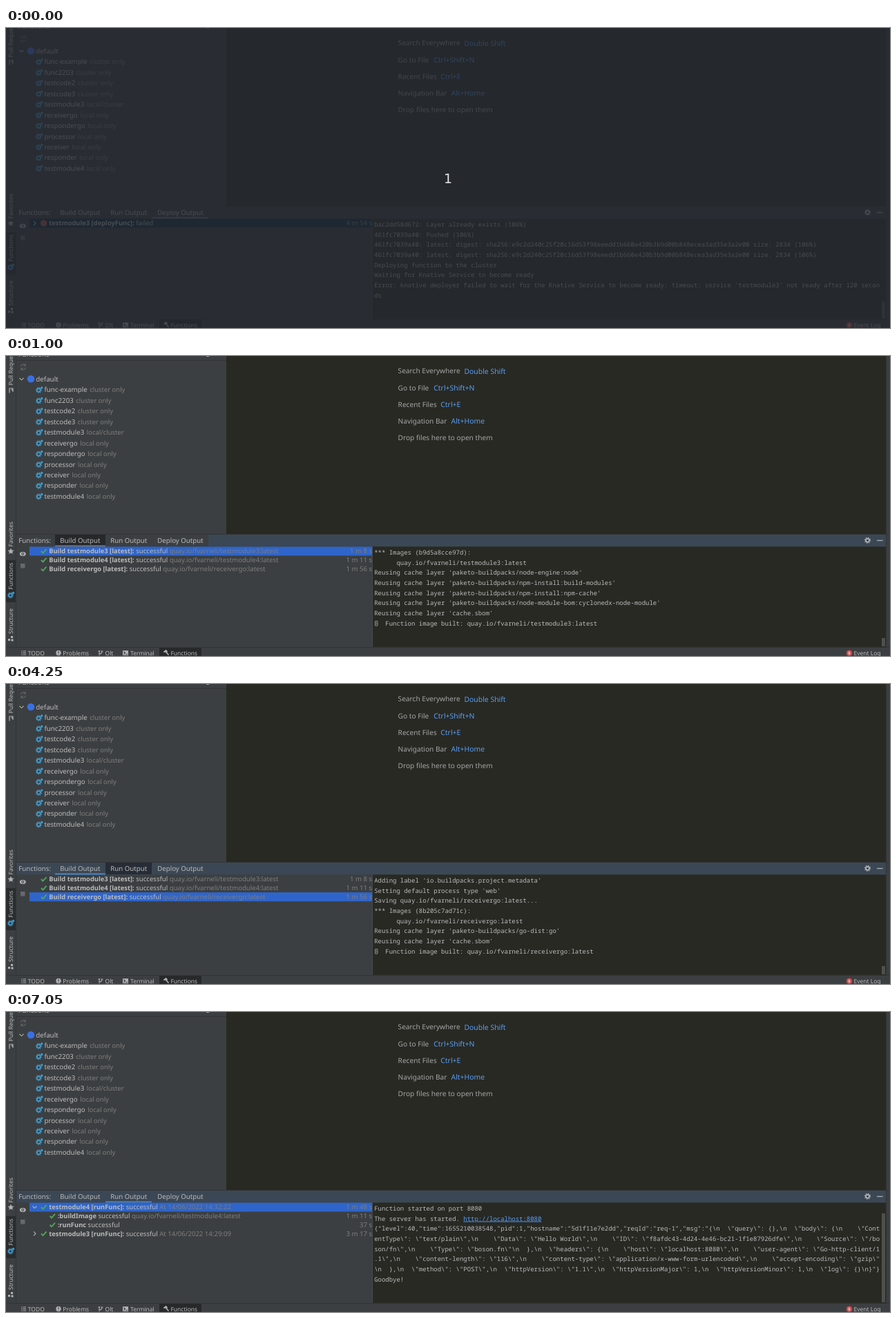
An HTML page that plays this animation: 1280 px wide and 435 px high, repeating every 8 s.

```html
<!DOCTYPE html>
<html lang="en">
<head>
<meta charset="utf-8">
<title>Functions output</title>
<style>
  html, body { margin: 0; width: 100%; height: 100%; overflow: hidden; background: #3c3f41; }
  svg { display: block; }
  text { font: 9.75px 'Noto Sans', sans-serif; fill: #bbb; white-space: pre; text-rendering: geometricPrecision; }
  .hint { font-size: 10.13px; fill: #a6a6a6; }
  .key { font-size: 10.4px; fill: #589df6; }
  .place { font-size: 9.45px; fill: #7d7d7d; }
  .tab { font-size: 9.7px; }
  .row { font-size: 9.6px; }
  .row .name { font-size: 9.35px; font-weight: bold; }
  .bar { font-size: 8.5px; }
  .log { font: 8.98px 'Noto Sans Mono', monospace; }
  .dim { fill: #7d7d7d; }
  .end { text-anchor: end; }
  .link { fill: #589df6; text-decoration: underline; }
  .count { font: 19px 'DejaVu Sans', sans-serif; fill: #e4e5e6; text-anchor: middle; }
  .badge { font-size: 6px; fill: #fff; text-anchor: middle; }
</style>
</head>
<body>
<svg width="1280" height="435" viewBox="0 0 1280 435" xml:space="preserve"><g id="frame"></g><g id="panel"></g></svg>
<script>
const DURATION = 8000;
const COLUMNS = 136;
const GREY = '#afb1b3';
const repo = name => `quay.io/fvarneli/${name}:latest`;

// Drawing helpers; text is placed by the middle of its capitals.
const rect = (x, y, w, h, fill) => `<rect x="${x}" y="${y}" width="${w}" height="${h}" fill="${fill}"/>`;
const disc = (x, y, r, fill) => `<circle cx="${x}" cy="${y}" r="${r}" fill="${fill}"/>`;
const line = (d, color = GREY, width = 1.1) => `<path d="${d}" fill="none" stroke="${color}" stroke-width="${width}"/>`;
const text = (x, y, content, cls = '', extra = '') =>
  `<text x="${x}" y="${y}" dy=".357em" class="${cls}" ${extra}>${content}</text>`;
const span = (content, cls, dx = 0) => `<tspan class="${cls}" dx="${dx}">${content}</tspan>`;
const sideways = (bottom, label) => text(0, 0, label, 'bar', `transform="translate(7 ${bottom}) rotate(-90)"`);
const cog = (x, y, r, color) =>
  `<g fill="none" stroke="${color}"><circle cx="${x}" cy="${y}" r="${r * .65}" stroke-width="${r * .45}"/>` +
  `<circle cx="${x}" cy="${y}" r="${r}" stroke-width="${r * .4}" stroke-dasharray="${r * .3927}"/></g>`;
const chevron = (x, y, open) =>
  line(open ? `M${x - 3} ${y - 1.5}l3 3 3-3` : `M${x - 1.5} ${y - 3}l3 3-3 3`);
const check = (x, y) => line(`M${x - 3.6} ${y}l2.6 2.7 5-5.6`, '#4fa45a', 1.9);

const functions = [
  ['func-example', 'cluster only'], ['func2203', 'cluster only'], ['testcode2', 'cluster only'],
  ['testcode3', 'cluster only'], ['testmodule3', 'local/cluster'], ['receivergo', 'local only'],
  ['respondergo', 'local only'], ['processor', 'local only'], ['receiver', 'local only'],
  ['responder', 'local only'], ['testmodule4', 'local only']
];
const hints = [
  ['Search Everywhere', 'Double Shift', 663.5], ['Go to File', 'Ctrl+Shift+N', 619.3],
  ['Recent Files', 'Ctrl+E', 629.3], ['Navigation Bar', 'Alt+Home', 644.5],
  ['Drop files here to open them', '', 0]
];
const tabs = [['Build Output', 71, 73, 78.2], ['Run Output', 144, 67, 151.2], ['Deploy Output', 211, 82, 219.2]];
const TABS_END = 293;

function drawFrame() {
  const tree = functions.map(([name, place], i) => {
    const y = 49 + i * 15.44;
    return cog(47.4, y + .5, 3.7, '#3e9bd0') + disc(51.8, y - 3, 1.7, '#3e9bd0') +
      text(55.4, y, `${name} ${span(place, 'place', 1)}`);
  }).join('');
  const welcome = hints.map(([label, key, x], i) => {
    const y = 21.8 + i * 24.15;
    return text(567.6, y, label, 'hint') + text(x, y, key, 'hint key');
  }).join('');

  return rect(0, 0, 1280, 435, '#3c3f41') + rect(14, 0, 1, 422, '#323435') +
    rect(319, 0, 955, 258, '#282923') + rect(1274, 0, 1, 422, '#323435') +
    rect(0, 296, 14, 61, '#2a2c2d') + rect(222, 423, 61, 12, '#27292a') +
    // left strip
    sideways(42.5, 'Pull Requests') + line('M5 46.500v7M5 47h5v5M8 50l2-3', GREY, 1.2) +
    sideways(276.5, 'Favorites') +
    `<path d="M7 278.500l1.300 3 3.200.3-2.400 2.100.7 3.200-2.800-1.700-2.800 1.700.7-3.200-2.400-2.100 3.200-.3z" fill="${GREY}"/>` +
    sideways(338.5, 'Functions') + cog(6.4, 347, 3.7, '#3e9bd0') + disc(10.5, 343.5, 1.7, '#3e9bd0') +
    sideways(403, 'Structure') + rect(7, 406, 3, 3, GREY) + rect(3, 410, 3, 3, GREY) + rect(7.5, 410.5, 3, 3, GREY) +
    // function tree
    text(18.3, -2, 'Functions') + disc(292, -2, 3, GREY) + rect(15, 6, 304, 1, '#323435') +
    line('M21.500 15.500a3.500 3.500 0 0 1 6.300-2M28.500 16.500a3.500 3.500 0 0 1-6.300 2M28 11v3h-3M22 21v-3h3', '#66696b') +
    chevron(22.5, 33.3, true) + disc(36, 33.3, 5.3, '#3970e4') + text(43.3, 33.5, 'default') + tree + welcome +
    // bottom bar
    rect(0, 422, 1280, 1, '#323435') +
    line('M22 428h1.500M24.500 428h4.500M22 430.500h1.500M24.500 430.500h4.500M22 433h1.500M24.500 433h4.500') +
    text(31.8, 430.7, 'TODO', 'bar') +
    disc(76, 430.5, 3.7, GREY) + line('M76 428v3M76 432v1', '#3c3f41') + text(82.3, 430.7, 'Problems', 'bar') +
    line('M135 427v7M135 432q4 0 4-4M133.500 428h3M137.500 428h3') + text(143.5, 430.7, 'Olt', 'bar') +
    rect(169, 427, 8, 7, GREY) + line('M170.500 428.500l2 2-2 2M173.500 432.500h2.500', '#3c3f41') +
    text(180, 430.7, 'Terminal', 'bar') +
    line('M228.500 429.500l3-2.500 2 2M231 428.500l4.500 5', GREY, 1.8) + text(238.4, 430.7, 'Functions', 'bar') +
    disc(1221, 430.7, 4.3, '#c94f4f') + text(1221, 430.7, '8', 'badge') + text(1227.5, 430.7, 'Event Log', 'bar');
}

// Rows: [name, status, detail, duration, arrow, child]
const build = (name, time) => [`Build ${name} [latest]:`, 'successful', repo(name), time];
const run4 = ['testmodule4 [runFunc]:', 'successful', 'At 14/06/2022 14:32:22', '1 m 48 s'];
const run3 = ['testmodule3 [runFunc]:', 'successful', 'At 14/06/2022 14:29:09', '3 m 17 s', 'closed'];
const lists = {
  deploy: [['testmodule3 [deployFunc]:', 'failed', '', '4 m 54 s', 'closed']],
  build: [build('testmodule3', '1 m 8 s'), build('testmodule4', '1 m 11 s'), build('receivergo', '1 m 56 s')],
  run: [[...run4, 'closed'], run3],
  runOpen: [
    [...run4, 'open'],
    [':buildImage', 'successful', repo('testmodule4'), '1 m 11 s', '', true],
    [':runFunc', 'successful', '', '37 s', '', true],
    run3
  ]
};

const reuse = layers => layers.map(layer => `Reusing cache layer '${layer}'`);
const buildLog = (name, id, layers) => [
  `*** Images (${id}):`, `      ${repo(name)}`, ...reuse([...layers, 'cache.sbom']),
  `   Function image built: ${repo(name)}`
];
const nodeLayers = ['node-engine:node', 'npm-install:build-modules', 'npm-install:npm-cache',
  'node-module-bom:cyclonedx-node-module'].map(layer => 'paketo-buildpacks/' + layer);
const digest = '461fc7039a40: latest: digest: sha256:e9c2d240c25f20c16d53f98eeedd1b660e420b3b9d00b848ecea3ad35e3a2e00 size: 2834 (106%)';
const request = String.raw`{"level":40,"time":1655210038548,"pid":1,"hostname":"5d1f11e7e2dd","reqId":"req-1","msg":"{\n  \"query\": {},\n  \"body\": {\n    \"ContentType\": \"text/plain\",\n    \"Data\": \"Hello World\",\n    \"ID\": \"f8afdc43-4d24-4e46-bc21-1f1e87926dfe\",\n    \"Source\": \"/boson/fn\",\n    \"Type\": \"boson.fn\"\n  },\n  \"headers\": {\n    \"host\": \"localhost:8080\",\n    \"user-agent\": \"Go-http-client/1.1\",\n    \"content-length\": \"116\",\n    \"content-type\": \"application/x-www-form-urlencoded\",\n    \"accept-encoding\": \"gzip\"\n  },\n  \"method\": \"POST\",\n  \"httpVersion\": \"1.1\",\n  \"httpVersionMajor\": 1,\n  \"httpVersionMinor\": 1,\n  \"log\": {}\n}"}`;
const wrap = s => s.match(new RegExp(`.{1,${COLUMNS}}`, 'g'));

const logs = {
  deploy: [
    'bac2dd58d672: Layer already exists (106%)', '461fc7039a40: Pushed (106%)', digest, digest,
    'Deploying function to the cluster', 'Waiting for Knative Service to become ready',
    ...wrap("Error: knative deployer failed to wait for the Knative Service to become ready: timeout: service 'testmodule3' not ready after 120 seconds")
  ],
  node3: buildLog('testmodule3', 'b9d5a8cce97d', nodeLayers),
  node4: buildLog('testmodule4', 'fdadb0b4d683', nodeLayers),
  go: [
    "Adding label 'io.buildpacks.project.metadata'", "Setting default process type 'web'",
    `Saving ${repo('receivergo')}...`,
    ...buildLog('receivergo', '8b205c7ad71c', ['paketo-buildpacks/go-dist:go'])
  ],
  run: [
    'Function started on port 8080',
    `The server has started. ${span('http://localhost:8080', 'link')}`,
    ...wrap(request), 'Goodbye!'
  ]
};
const thumbTop = { deploy: 397, run: 292 };

function drawRow([name, status, detail, time, arrow, child], i) {
  const y = 283 + i * 12.8;
  const x = child ? 67 : 54.5;
  const icon = status === 'failed'
    ? disc(x, y, 4.5, '#c75450') + line(`M${x} ${y - 2.5}v3M${x} ${y + 1.3}v1.200`, '#6e3a3c', 1.2)
    : check(x, y);
  return (arrow ? chevron(41.5, y, arrow === 'open') : '') + icon +
    text(x + 7.7, y, `${span(name, 'name')} ${status} ${span(detail, 'dim')}`, 'row') +
    text(530, y, time, 'row dim end');
}

const headerColor = active => active ? '#3b4754' : '#3c3f41';

function drawPanel(s) {
  const [, tabX, tabWidth] = tabs[s.tab];
  const hovered = tabs[s.hover];
  const top = thumbTop[s.log] || 409;
  return rect(15, 258, 1259, 1, '#323435') +
    rect(15, 259, TABS_END - 15, 17.5, headerColor(s.active)) +
    rect(TABS_END, 259, 1274 - TABS_END, 17.5, headerColor(s.restActive)) +
    (hovered ? rect(hovered[1], 259, hovered[2], 17, 'rgba(0,0,0,.36)') : '') +
    rect(tabX, 274.5, tabWidth, 2, s.active ? '#4a88c7' : '#747a80') +
    text(18.3, 267.7, 'Functions:', 'tab') +
    tabs.map(([label, , , x]) => text(x, 267.7, label, 'tab')).join('') +
    cog(1247.5, 267.3, 3.8, GREY) + line('M1261 267.500h8.500', GREY, 1.3) +
    `<ellipse cx="24.300" cy="287" rx="4.500" ry="3.100" fill="${GREY}"/>` + disc(24.3, 287, 1.9, '#3c3f41') +
    disc(24.3, 287, 1, GREY) + rect(21, 301, 6.5, 6.5, '#66696b') +
    rect(34, 276.5 + s.row * 12.8, 496, 13, s.rowActive ? '#2f65ca' : '#0d293e') +
    lists[s.list].map(drawRow).join('') +
    rect(530, 276.5, 1, 145.5, '#484a4c') + rect(531, 276.5, 743, 145.5, '#282923') +
    logs[s.log].map((entry, i) => text(533.2, 284.6 + i * 14.73, entry, 'log')).join('') +
    (s.list === 'build' ? line('M534.500 384.500h3.500v6.500h-3.500zM536.200 386v3.500', '#a5a5a5', .8) : '') +
    rect(1268, top, 5, 421 - top, '#4f504c') +
    (s.countdown ? rect(0, 0, 1280, 435, 'rgba(36,40,48,.76)') + text(640, 218, '1', 'count') : '');
}

// After a tab switch the tabs lose the focus colour briefly; the rest of the header keeps it.
const timeline = [
  [0, { tab: 2, hover: -1, active: false, restActive: false, row: 0, rowActive: false,
    list: 'deploy', log: 'deploy', countdown: true }],
  [50, { countdown: false }],
  [800, { hover: 0, rowActive: true }],
  [900, { active: true, restActive: true }],
  [1000, { tab: 0, active: false, list: 'build', log: 'node3' }],
  [1100, { active: true }],
  [1350, { hover: -1 }],
  [1600, { hover: 1 }],
  [2450, { hover: -1 }],
  [2900, { row: 1, log: 'node4' }],
  [3900, { row: 2 }],
  [3950, { log: 'go' }],
  [4250, { hover: 1 }],
  [5200, { tab: 1, row: 0, active: false, list: 'run', log: 'run' }],
  [5300, { active: true }],
  [5950, { hover: -1 }],
  [7050, { list: 'runOpen' }]
];

const panel = document.getElementById('panel');
document.getElementById('frame').innerHTML = drawFrame();
const start = performance.now();
let shown = 0;

function tick() {
  const time = (performance.now() - start) % DURATION;
  const steps = timeline.filter(([at]) => at <= time);
  if (steps.length !== shown) {
    shown = steps.length;
    panel.innerHTML = drawPanel(Object.assign({}, ...steps.map(step => step[1])));
  }
  requestAnimationFrame(tick);
}
tick();
</script>
</body>
</html>
```
